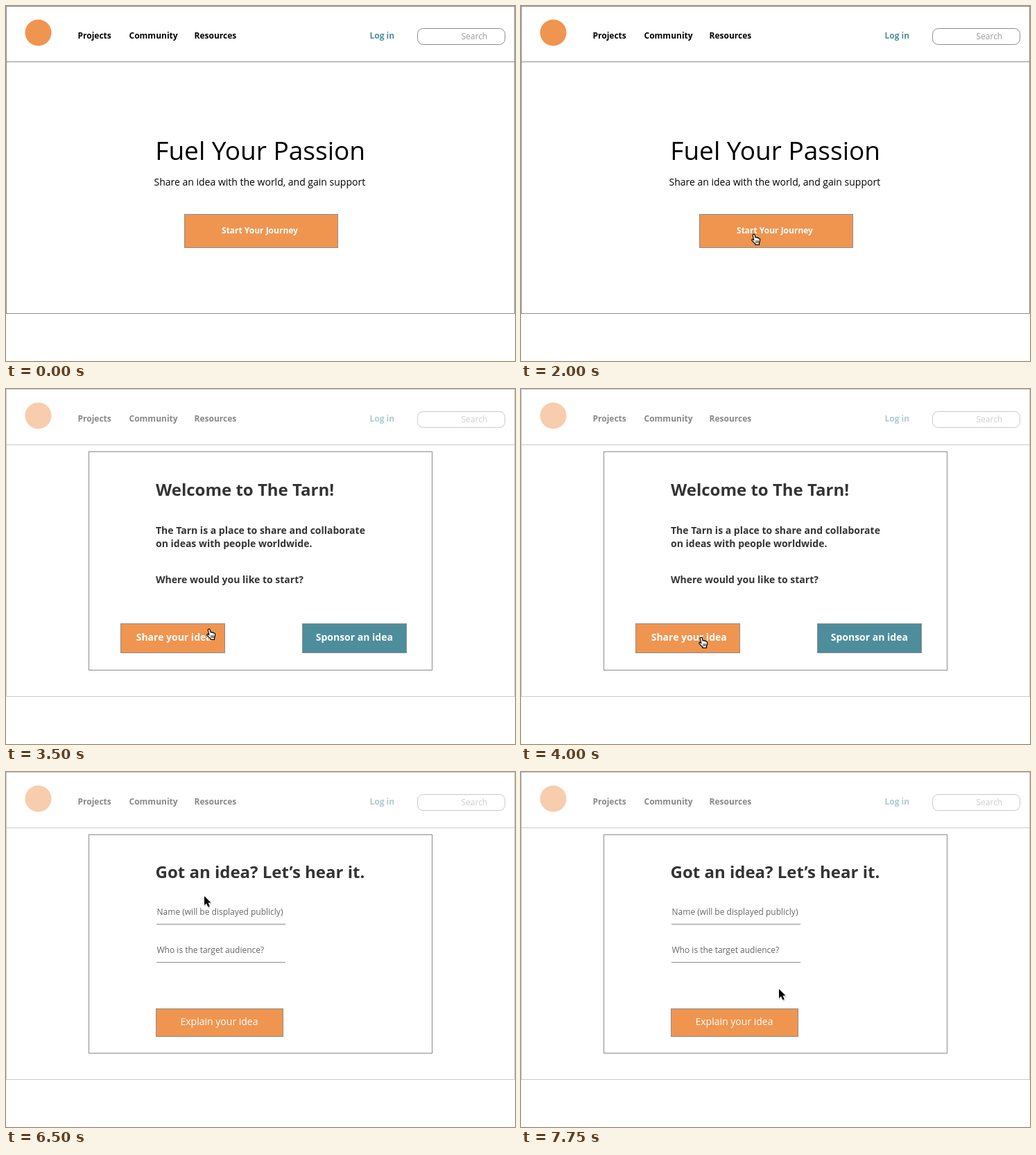
Recreate the animation shown at these times as an HTML page. Size 734 px wide and 512 px high, loop 8 s.

```html
<!DOCTYPE html>
<html lang="en">
<head>
<meta charset="utf-8">
<title>Share an idea</title>
<style>
  html, body { margin: 0; width: 100%; height: 100%; overflow: hidden; background: #fff; }
  svg { display: block; width: 100%; height: 100%; }
  text { font: 12px "Open Sans", sans-serif; white-space: pre; }
  .b { font-weight: 700; }
  .m { font-size: 14px; }
  .l { font-size: 24px; }
  .xl { font-size: 37px; }
  .mid { text-anchor: middle; }
  .box { fill: #fff; stroke: #8c8c8c; }
  .orange { fill: #ef9550; stroke: #8c8c8c; }
  .teal { fill: #4e8d9c; stroke: #8c8c8c; }
  .dark { fill: #333; }
  .grey { fill: #666; }
  .white { fill: #fff; }
</style>
</head>
<body>
<svg viewBox="0 0 734 512">
  <rect class="box" x=".5" y=".5" width="733" height="443"/>
  <path d="M0 80.5H734" stroke="#8c8c8c"/>
  <circle cx="46.5" cy="38.5" r="19" fill="#ef9550"/>
  <text class="b" x="103.5" y="47">Projects</text>
  <text class="b" x="177.5" y="47">Community</text>
  <text class="b" x="271.5" y="47">Resources</text>
  <text class="b" x="524.5" y="47" fill="#4e8d9c">Log in</text>
  <rect class="box" x="593.5" y="32.5" width="126" height="23" rx="8"/>
  <text x="656.5" y="48" fill="#999">Search</text>

  <g id="home">
    <text class="xl mid" x="366.7" y="222">Fuel Your Passion</text>
    <text class="m" x="213.5" y="259">Share an idea with the world, and gain support</text>
    <rect class="orange" x="257.5" y="300.5" width="221" height="48"/>
    <text class="b white mid" x="366" y="328">Start Your Journey</text>
  </g>

  <g id="modal">
    <rect width="734" height="444" fill="#fff" opacity=".53"/>
    <rect class="box" x="119.5" y="90.5" width="495" height="315"/>
    <g id="welcome">
      <text class="b l dark" x="216" y="154">Welcome to The Tarn!</text>
      <text class="b m dark" x="216" y="209">The Tarn is a place to share and collaborate</text>
      <text class="b m dark" x="216" y="228">on ideas with people worldwide.</text>
      <text class="b m dark" x="216" y="280">Where would you like to start?</text>
      <rect class="orange" x="165.5" y="338.5" width="150" height="42"/>
      <text class="b m white" x="187.7" y="363">Share your idea</text>
      <rect class="teal" x="427.5" y="338.5" width="150" height="42"/>
      <text class="b m white" x="446.7" y="363">Sponsor an idea</text>
    </g>
    <g id="form">
      <text class="b l dark" x="215.5" y="153">Got an idea? Let’s hear it.</text>
      <text class="grey" x="217.5" y="206">Name (will be displayed publicly)</text>
      <text class="grey" x="217.5" y="261">Who is the target audience?</text>
      <path d="M217 219.5H403M217 274.5H403" stroke="#8c8c8c"/>
      <rect class="orange" x="216.5" y="341.5" width="183" height="40"/>
      <text class="m white" x="251.5" y="365">Explain your idea</text>
    </g>
  </g>

  <g id="arrow">
    <path d="M1.5 2.5V16L4.5 13.2 6.9 18.4 9.6 17.2 7.3 12.2H11.5Z" fill="#000" opacity=".18" stroke="#000"/>
    <path d="M1 1V14.2L4 11.4 6.4 16.8 8.8 15.7 6.5 10.6H10.6Z" fill="#000" stroke="#fff" stroke-width="1.6" paint-order="stroke"/>
  </g>
  <g id="hand" stroke-linejoin="round" stroke-linecap="round">
    <path id="palm" d="M3.2 2.4C3.6.7 5.9.8 6.2 2.2L7.1 6C8 5.2 9.1 5.5 9.5 6.4 10.3 5.8 11.4 6.1 11.7 7.1 12.8 6.8 13.6 7.6 13.6 8.8 13.7 11.3 13.1 13 12.5 14.2V16.4H7V15.3L4.9 13.3 2 10.2C1.2 8.8 2.6 8 3.7 8.8L4.9 9.8Z" fill="#fff" stroke="#000" stroke-width="1.2"/>
    <path d="M7.9 10.6V13.6M9.6 10.6V13.6M11.3 10.6V13.6" fill="none" stroke="#000" stroke-width=".8"/>
  </g>
</svg>
<script>
const LOOP = 8000, FORM_AT = 5250, MODAL_AT = 2750;
const $ = id => document.getElementById(id);
const show = (id, on) => $(id).setAttribute("display", on ? "inline" : "none");

// time, cursor, left, top
const steps = [
  [0, ""],
  [250, "arrow", 329, 29],
  [500, "arrow", 269, 66],
  [750, "arrow", 178, 107],
  [1250, "arrow", 281, 215],
  [1500, "arrow", 318, 288],
  [1750, "hand", 330, 325],
  [2000, "hand", 331, 328],
  [2750, "arrow", 335, 326],
  [3250, "arrow", 324, 330],
  [3500, "hand", 288, 345],
  [3750, "hand", 264, 354],
  [4000, "hand", 255, 357],
  [6000, "arrow", 307, 333],
  [6250, "arrow", 299, 230],
  [6500, "arrow", 285, 178],
  [6750, "arrow", 389, 149],
  [7000, "arrow", 408, 202],
  [7250, "arrow", 408, 242],
  [7500, "arrow", 375, 275],
  [7750, "arrow", 371, 312]
];

function draw(t) {
  show("home", t < MODAL_AT);
  show("modal", t >= MODAL_AT);
  show("welcome", t < FORM_AT);
  show("form", t >= FORM_AT);
  const [, cursor, x, y] = steps.findLast(s => s[0] <= t);
  for (const id of ["arrow", "hand"]) show(id, id === cursor);
  if (cursor) $(cursor).setAttribute("transform", `translate(${x} ${y})`);
}

const start = performance.now();
function tick() {
  draw((performance.now() - start) % LOOP);
  requestAnimationFrame(tick);
}
tick();
</script>
</body>
</html>
```
